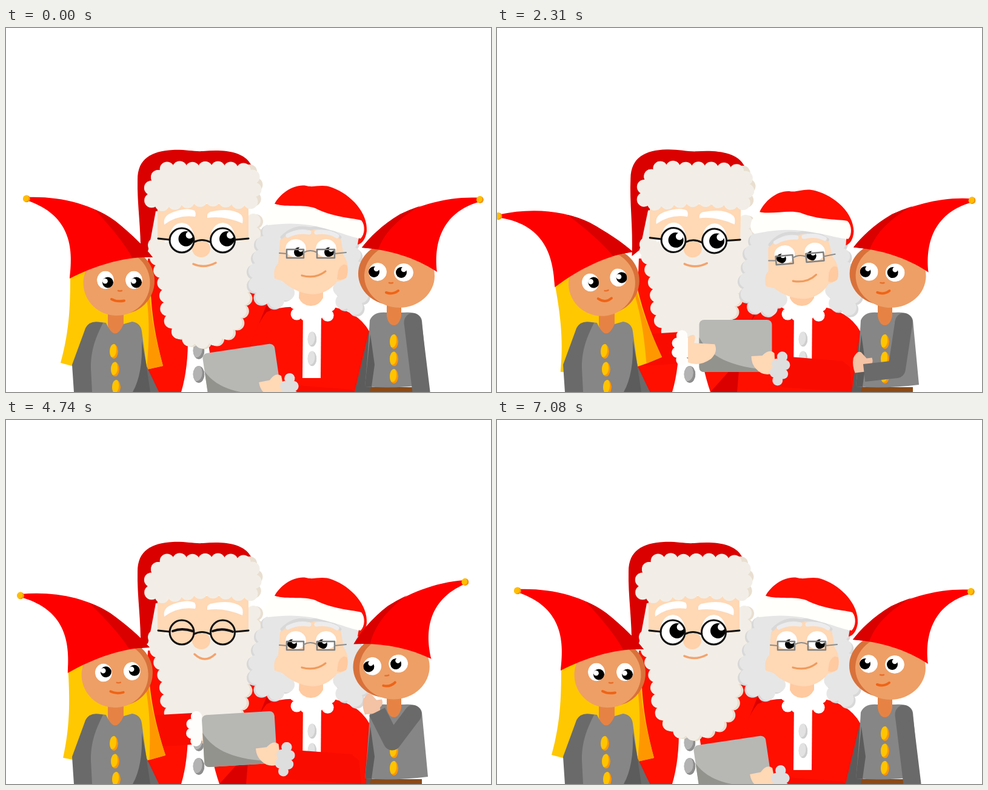
Write an HTML page with a canvas that moves like this. It is 800 px wide and 600 px high and loops after 7290 ms.

```html
<!DOCTYPE html>
<html lang="en">
<head>
<meta charset="utf-8">
<title>Family with tablet</title>
<style>
html, body { margin: 0; width: 100%; height: 100%; overflow: hidden; background: #fff; }
canvas { display: block; width: 800px; height: 600px; }
</style>
</head>
<body>
<canvas id="stage" width="800" height="600"></canvas>
<script>
const g = document.getElementById('stage').getContext('2d');
const LOOP = 7290;
const RED = '#ff0f00', SLEEVE = '#f90b00', DEEP = '#da0000', HAT = '#fe0000';
const FUR = '#f2eee7', TAN = '#e9dfd0', SKIN = '#ffd8b5', BLUSH = '#ffcaa0';
const HAIR = '#e6e6e6', SHADE = '#d8d8d9';
const GRAY = '#868686', DARK = '#6a6a6a', COAL = '#5c5c5c';
const ELF = '#ee9f66', TANNED = '#d9713a', NECK = '#e68344';

// ---- timing ----
function ease(t, from, to) {
  const p = Math.max(0, Math.min(1, (t - from) / (to - from)));
  return (1 - Math.cos(Math.PI * p)) / 2;
}
// Rises from a to b, falls again from c to d.
const pulse = (t, a, b, c, d) => ease(t, a, b) - ease(t, c, d);
const within = (t, a, b) => t >= a && t < b;
const mix = (a, b, p) => a + (b - a) * p;

function pose(t) {
  const up = pulse(t, 0, 1590, 6330, 7080);
  const aside = pulse(t, 3000, 3600, 4900, 5800);
  const wave = pulse(t, 1830, 2800, 2900, 3600);
  const lift = pulse(t, 4000, 4740, 4900, 5900);
  const lean = pulse(t, 0, 1590, 2390, 3070);
  const nod = pulse(t, 4100, 4740, 5750, 6390);
  const away = 1 - pulse(t, 0, 1500, 6400, 7050);
  return {
    santaTilt: 5 * pulse(t, 600, 1500, 1830, 2550),
    santaLook: [4 + 3 * away - 4 * pulse(t, 4650, 5500, 6400, 7050), 5 - 2.5 * away],
    santaShut: within(t, 4650, 4830),
    santaGrin: within(t, 900, 2200) || within(t, 4400, 5100),
    cuff: [309 - 12 * wave + 8 * aside - 5 * lift, 655 - 117 * up - 22 * wave + 7 * aside - 36 * lift],
    handBehind: within(t, 3250, 5300),
    wifeTilt: -5 * pulse(t, 600, 1500, 2900, 3500),
    wifeLook: [-6 + 11 * away, 6.5],
    tablet: [389 + 4.5 * up - 8.5 * aside, 571 - 47 * up + 2 * aside, -8.4 * (1 - up) - 3.4 * aside],
    girlTilt: -10 * lean - 3 * nod,
    girlLook: [4 + 1.5 * lean, 4 - 3 * lean - 5 * nod],
    girlGrin: within(t, 1000, 2700),
    boyTilt: 4.5 * pulse(t, 720, 1500, 1830, 3200) - 10 * ease(t, 1830, 3200) + 8 * ease(t, 3200, 3650) -
      8.5 * ease(t, 3780, 5500) + 10.5 * ease(t, 5500, 6050),
    boyShut: within(t, 2790, 2970),
    boyArm: pulse(t, 1830, 2750, 5500, 6000),
    boyReach: pulse(t, 3900, 4800, 5500, 6000),
  };
}

// ---- drawing helpers ----
const memo = new Map();
function cached(key, make) {
  if (!memo.has(key)) memo.set(key, make());
  return memo.get(key);
}
const path = d => cached(d, () => new Path2D(d));
function shape(d, color) { g.fillStyle = color; g.fill(path(d)); }
function line(d, color, w) {
  g.strokeStyle = color; g.lineWidth = w; g.lineCap = 'round'; g.lineJoin = 'round';
  g.stroke(path(d));
}
function oval(x, y, rx, ry, color) {
  g.fillStyle = color;
  g.beginPath();
  g.ellipse(x, y, rx, ry, 0, 0, 7);
  g.fill();
}
function poly(pts, color) {
  g.fillStyle = color;
  g.beginPath();
  for (const [x, y] of pts) g.lineTo(x, y);
  g.fill();
}
// A filled outline with evenly spaced round bumps along it.
function fluff(d, r, color, dx = 0, dy = 0) {
  const dots = cached(d + r, () => {
    const el = document.createElementNS('http://www.w3.org/2000/svg', 'path');
    el.setAttribute('d', d);
    const len = el.getTotalLength(), n = Math.round(len / (r * 1.8));
    return Array.from({ length: n + 1 }, (_, i) => el.getPointAtLength(len * i / n));
  });
  g.save();
  g.translate(dx, dy);
  shape(d, color);
  for (const p of dots) oval(p.x, p.y, r, r, color);
  g.restore();
}
function at(x, y, deg, draw) {
  g.save();
  g.translate(x, y);
  g.rotate(deg * Math.PI / 180);
  draw();
  g.restore();
}
function turn(x, y, deg, draw) {
  at(x, y, deg, () => { g.translate(-x, -y); draw(); });
}
function inside(x, y, rx, ry, draw) {
  g.save();
  g.beginPath();
  g.ellipse(x, y, rx, ry, 0, 0, 7);
  g.clip();
  draw();
  g.restore();
}
function button(x, y, rx, ry, light, dark) {
  inside(x, y, rx, ry, () => {
    oval(x, y, rx, ry, dark);
    oval(x - rx * 0.4, y - ry * 0.2, rx, ry, light);
  });
}
const gold = (x, y) => button(x, y, 7, 12, '#ffc400', '#ff9500');
const bell = (x, y) => button(x, y, 6, 6, '#ffbe00', '#f59412');

function eye(x, y, rx, ry, [dx, dy], r, [sx, sy]) {
  inside(x, y, rx, ry, () => {
    oval(x, y, rx, ry, '#fff');
    oval(x + dx, y + dy, r, r, '#000');
    oval(x + dx + sx * r, y + dy + sy * r, r * 0.48, r * 0.48, '#fff');
  });
}

// ---- Santa ----
const BEARD = 'M246 358C248 390 262 410 265 440C262 490 295 520 325 516C360 511 380 492 385 465' +
  'C393 440 399 400 405 375C409 350 408 335 408 318';

function santaBody() {
  shape('M234 380H425L445 480L430 600H225Z', RED);
  shape('M430 456L401 528L420 530L440 470ZM352 600L388 560H425L410 600Z', DEEP);
  shape('M300 505H332Q338 560 352 600H289Q301 560 300 505Z', '#fff');
  for (const y of [532, 571]) button(318, y, 9.5, 14, '#b3b3b3', '#8e8e8e');
}

function santaHead(p) {
  turn(312, 402, p.santaTilt, () => {
    shape('M217 250C217 215 240 203 275 201C295 200 310 204 325 203C355 200 392 202 404 225' +
      'L404 260L250 300C245 320 240 350 234 368L222 378C223 330 216 290 217 250Z', DEEP);
    fluff(BEARD, 12, TAN, 4, 1);
    fluff(BEARD, 12, FUR);
    shape('M247 302L234 372L262 400V302Z', FUR);
    shape('M250 290H400V350H250Z', SKIN);
    shape('M261 324Q258 309 277 303Q300 295 311 301Q314 306 312 311Q284 307 261 324Z' +
      'M332 313Q331 305 337 303Q372 295 388 308Q392 313 390 322Q360 309 332 313Z', '#fff');
    oval(322, 364, 15, 14, '#ffd2ab');

    if (p.santaShut) {
      for (const x of [290, 357.5]) oval(x, 350, 20, 20, SKIN);
      line('M275 348Q290 342 308 348M341 348Q357 342 374 349', '#111', 4);
    } else {
      for (const x of [290, 357.5]) eye(x, 345, 20, 24, p.santaLook, 12.5, [0.45, -0.5]);
    }
    for (const x of [290, 357.5]) {
      g.beginPath();
      g.arc(x, 350, 20, 0, 7);
      g.strokeStyle = '#111';
      g.lineWidth = 3;
      g.stroke();
    }
    line('M310 353Q323 346 337 353M251 347L270 349M378 349L400 347', '#111', 3);
    line(p.santaGrin ? 'M311 386Q328 402 345 386' : 'M309 389Q327 397 346 387', '#f5a26b', 3.5);

    fluff('M402 237Q422 265 402 294Z', 12, TAN);
    fluff('M251 246C255 228 280 230 310 233C340 230 380 232 402 236C411 250 413 275 402 288' +
      'C380 287 350 280 320 283C290 285 260 292 243 290C236 280 236 258 251 246Z', 12, FUR);
  });
}

function santaSleeve([x, y]) {
  poly([[235, y - 22], [x - 4, y - 26], [x - 4, y + 26], [235, y + 30]], SLEEVE);
  at(x, y, 0, () => fluff('M2 -20C14 -20 8 20 2 20C-10 20 -8 -20 2 -20Z', 9, '#fffdfb'));
}
function santaHand([x, y]) {
  at(x, y, 0, () => shape('M12 -18Q28 -28 22 -8L56 -6Q62 6 50 18Q30 32 12 24Z', SKIN));
}

// ---- Mrs Claus ----
const LOCK_L = 'M436 336C420 350 424 380 412 402C408 430 425 450 440 449C465 452 468 430 462 405L458 345Z';
const LOCK_R = 'M550 340C575 340 570 380 577 400C582 430 593 450 575 460C555 462 550 440 553 425L558 380Z';

function wifeBody() {
  shape('M430 468Q455 458 480 460H540Q588 470 604 510V600H396L402 528Q412 490 430 468Z', RED);
  shape('M490 465H520L519 577H489Z', '#fff');
  for (const y of [513, 545]) button(505, y, 7.5, 12.5, '#e2e2e2', '#cfcfcf');
  fluff('M480 436Q474 465 482 476Q505 470 532 474Q537 455 530 436Z', 10, '#fff');
  shape('M484 425H523V445Q515 459 502 458Q488 457 483 445Z', BLUSH);
}

function wifeHead(p) {
  turn(592, 410, p.wifeTilt, () => {
    fluff(LOCK_L, 13, SHADE, -3, 2);
    fluff(LOCK_R, 13, SHADE, 3, 3);
    fluff(LOCK_L, 13, HAIR);
    fluff(LOCK_R, 13, HAIR);
    shape('M440 320H570V350H440Z', HAIR);
    shape('M452 350C465 328 540 328 552 346L557 375Q567 388 562 411Q554 417 546 418' +
      'Q530 439 504 439Q476 436 456 417L443 413Q440 396 449 388Z', SKIN);
    shape('M548 400Q555 385 563 392Q565 404 561 412Q553 417 546 414Z', BLUSH);
    line('M455 345Q475 324 502 331Q530 325 551 345', SHADE, 5);
    line('M465 342Q480 334 500 337M512 337Q532 334 546 343', '#ececee', 7);

    for (const x of [478, 528]) eye(x, 363, 17, 15, p.wifeLook, 8, [0.4, -0.55]);
    shape('M460 380H546V384H460Z', SKIN);
    line('M463 365H491V379H463ZM513 365H542V379H513Z', '#808080', 2.5);
    line('M491 370Q502 364 513 370M451 371L463 372M542 372L561 370', '#8c8c8c', 2);
    line('M488 408Q511 414 527 401', '#f09b5c', 3.2);

    shape('M443 290C453 272 475 257 495 260C508 264 520 256 538 263C570 275 597 305 595 335' +
      'Q592 354 580 357L586 320C560 315 540 316 520 308C495 298 470 298 443 290Z', RED);
    shape('M443 290C465 296 490 290 510 297C540 312 565 312 586 317C593 325 592 340 585 347' +
      'C570 345 555 338 535 333C500 322 470 320 432 325C420 318 428 295 443 290Z', '#fffffb');
  });
}

// ---- tablet and the arms around it ----
function tablet(p) {
  const [x, y, deg] = p.tablet;
  poly([[x + 78, y + 17], [570, y + 25], [582, y + 35], [586, 600], [x + 76, Math.max(y + 66, 592)]], SLEEVE);
  santaSleeve(p.cuff);
  if (p.handBehind) santaHand(p.cuff);
  at(x, y, deg, () => {
    g.beginPath();
    g.roundRect(-60, -43, 120, 86, 8);
    g.fillStyle = '#b7b7b4';
    g.fill();
    shape('M-60 -14C-45 15 -10 36 60 40Q58 43 52 43H-52Q-60 43 -60 35Z', '#93938d');
    shape('M26 17L44 16Q56 4 64 12L66 44Q46 52 34 38Q26 30 26 17Z', SKIN);
    fluff('M77 18C88 25 76 60 69 57C60 55 66 22 77 18Z', 8.5, '#dedede');
  });
  if (!p.handBehind) santaHand(p.cuff);
}

// ---- elves ----
function girl(p) {
  turn(182, 475, p.girlTilt, () => {
    shape('M106 400C106 450 106 495 90 552Q170 575 232 563L259 557C244 500 238 460 238 400Z', '#ffc800');
    shape('M230 430C238 480 236 520 232 563L259 557C245 505 238 470 236 425Z', '#ff9800');
  });
  shape('M168 462H194V490Q190 505 180 506Q170 505 168 490Z', NECK);
  shape('M131 495Q138 481 165 486Q180 520 194 488L208 484Q222 486 224 500L232 560L252 600H112Z', GRAY);
  shape('M131 495Q138 480 160 486C148 510 140 530 140 560L142 600H112L109 555Z', DARK);
  shape('M224 515L232 558L252 600H209Q226 570 224 515Z', COAL);
  shape('M229 540L232 558L252 600H238Z', DARK);
  for (let i = 0; i < 3; i++) gold(178 + 2 * i, 533 + 29.5 * i);

  turn(182, 475, p.girlTilt, () => {
    oval(188, 417, 57, 55, TANNED);
    oval(182.5, 420, 55, 54, ELF);
    for (const x of [164, 211]) eye(x, 415.5, 14, 15, p.girlLook, 9, [-0.5, -0.25]);
    line('M185 433Q188 434 191 433', '#e8702c', 2.5);
    line(p.girlGrin ? 'M172 444Q182 454 194 447' : 'M174 447Q183 452 195 449.5', '#ef6417', 4);
    shape('M34 279C90 277 140 290 180 318C205 338 228 360 242 378C200 376 150 390 105 413' +
      'C110 370 112 310 34 284Z', HAT);
    shape('M146 299C175 330 195 355 208 378L242 378C228 360 205 338 180 318Q164 306 146 299Z', DEEP);
    bell(34, 281.5);
  });
}

function boy(p) {
  poly([[600, 495], [mix(575, 594, p.boyArm), 600], [602, 600], [608, 555]], COAL);
  shape('M602 592H686V600H600Z', '#8b4a16');
  shape('M600 482Q606 467 628 469H656Q683 467 686 482L696 588Q640 595 592 591Q597 540 600 482Z', GRAY);
  shape('M601 505L592 591H603L608 555Z', COAL);
  shape('M628 450H652V475Q648 490 640 490Q631 490 628 475Z', NECK);
  for (let i = 0; i < 3; i++) gold(640, 517 + 28.5 * i);

  turn(640, 475, p.boyTilt, () => {
    oval(639, 405, 58, 52, TANNED);
    oval(649, 408.5, 58, 52.5, ELF);
    if (p.boyShut) {
      line('M599 406Q612 400 630 405M647 404Q660 398 677 404', '#111', 3);
    } else {
      eye(613, 402, 15, 15, [-6, 0], 9, [0.45, -0.55]);
      eye(656, 403, 16, 15, [-4, 0], 9, [0.45, -0.55]);
    }
    line('M632 420Q635 421 638 420', '#e8702c', 2.5);
    line('M627 436Q638 440 647 433', '#ef6417', 4);
    shape('M782 280C730 277 685 292 650 307C620 325 600 345 587 362C630 365 675 378 711 402' +
      'C706 360 715 305 782 286Z', HAT);
    shape('M684 293C650 312 625 335 614 365L587 362C600 345 620 325 650 307Q666 299 684 293Z', DEEP);
    bell(782, 283);
  });
  boyArm(p);
}

// The forearm swings round the elbow, from hanging down to the chin.
function boyArm(p) {
  const ex = mix(685, 637, p.boyArm), ey = mix(600, 530, p.boyArm);
  const a = mix(90, 246, p.boyArm) * Math.PI / 180;
  const hx = ex + 54 * Math.cos(a) - 3 * p.boyReach, hy = ey + 54 * Math.sin(a);
  if (p.boyArm > 0) {
    at(hx - 2 - 5 * p.boyReach, hy - 20 + 5 * p.boyReach, 0, () =>
      shape('M-16 -4Q-10 -18 -3 -14L6 -4L15 -5Q18 4 12 8L12 17L-13 20Q-18 8 -16 -4Z', '#f4c2a4'));
  }
  g.strokeStyle = DARK;
  g.lineCap = 'butt';
  g.lineJoin = 'round';
  g.lineWidth = 29;
  g.beginPath();
  g.moveTo(671, 485);
  g.lineTo(ex, ey);
  g.lineTo(hx, hy);
  g.stroke();
  oval(671, 485, 14.5, 15, DARK);
}

function draw(t) {
  const p = pose(t);
  g.fillStyle = '#fff';
  g.fillRect(0, 0, 800, 600);
  santaBody();
  santaHead(p);
  wifeBody();
  wifeHead(p);
  tablet(p);
  girl(p);
  boy(p);
}

const start = performance.now();
function tick() {
  draw((performance.now() - start) % LOOP);
  requestAnimationFrame(tick);
}
tick();
</script>
</body>
</html>
```
